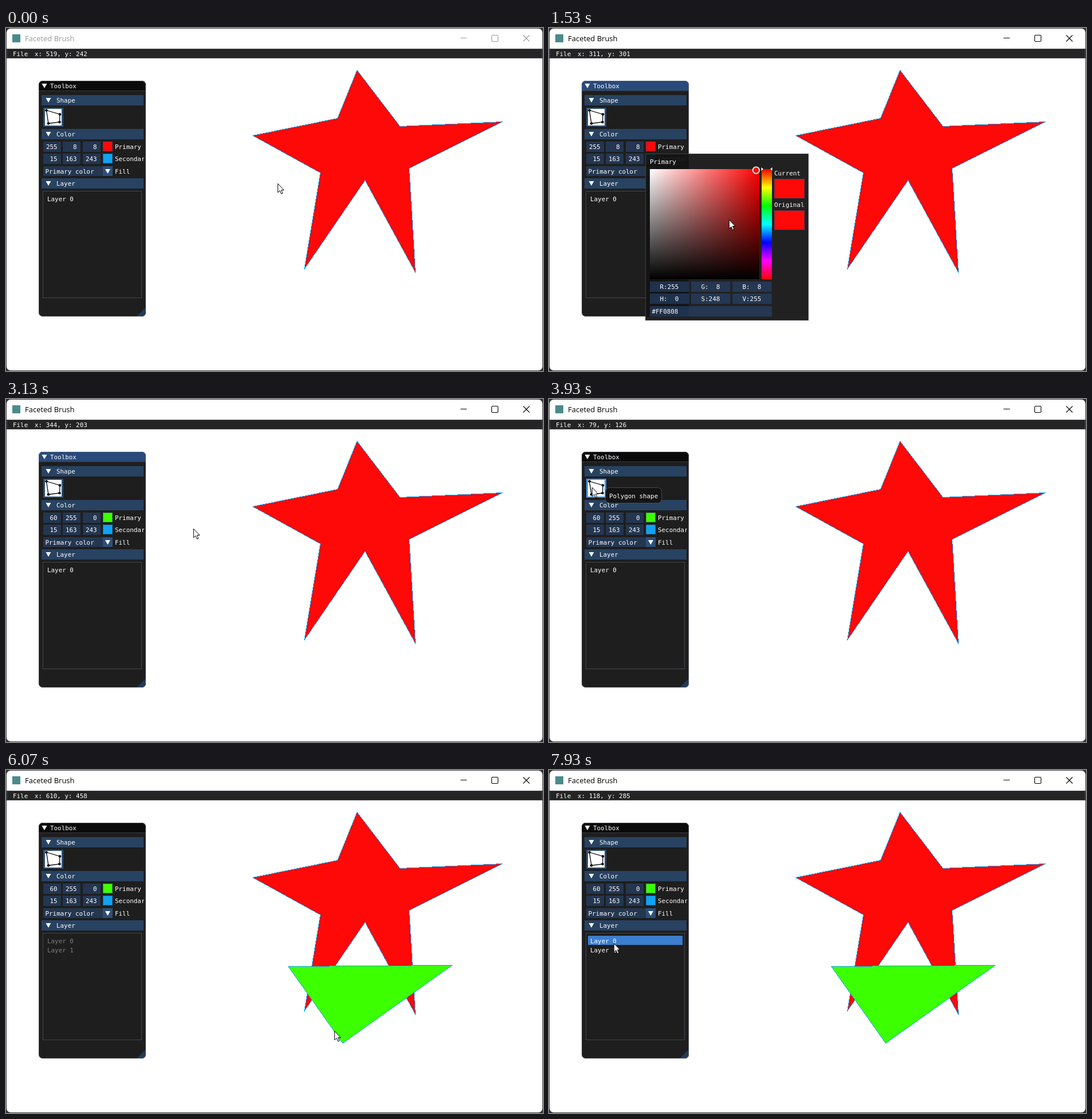
Recreate the animation shown at these times as an HTML page with a canvas. Size 937 by 598 pixels, loop 8000 ms.

```html
<!DOCTYPE html>
<html lang="en">
<head>
<meta charset="utf-8">
<title>Faceted Brush</title>
<style>
html, body { margin: 0; width: 100%; height: 100%; overflow: hidden; background: #333; }
canvas { display: block; width: 937px; height: 598px; }
</style>
</head>
<body>
<canvas id="stage" width="937" height="598"></canvas>
<script>
const ctx = document.getElementById('stage').getContext('2d');
const LOOP = 8000, TICK = 200 / 3, LAG = TICK / 2;
const MONO = '10.9px "DejaVu Sans Mono", monospace';
const SANS = '13px "Open Sans", "Noto Sans", sans-serif';
const FIELD = 'rgba(41,74,122,.54)', EDGE = 'rgba(110,110,128,.5)';
const BUTTON = 'rgb(45,79,119)';
const SECOND = [15, 163, 243];

// Colour picker geometry
const SV = { x: 176, y: 246, w: 191, h: 192 };

// Pointer strokes: start, end, then the point reached
const HOME = [493, 262];
const STROKES = [
  [-30, 67, 340, 338],
  [200, 933, 177, 208],    // primary swatch
  [1340, 1585, 319, 339],
  [1600, 1733, 380, 330],  // hue bar
  [1733, 2067, 381, 302.5],
  [2267, 2467, 347, 264],  // shade square
  [2467, 2733, 375, 236],
  [2800, 3133, 327, 226],
  [3200, 3960, 75, 154],   // polygon button
  [4067, 4667, 492, 342],  // first corner
  [4890, 4975, 677, 345],
  [5000, 5133, 778, 340],  // second corner
  [5333, 5733, 587, 476],  // third corner
  [5867, 6400, 522, 376],
  [7064, 7130, 311, 348],
  [7133, 7467, 120, 306],  // layer list
  [7667, 7950, 113, 302]
];

const STAR = [[612, 73], [687, 171], [866, 163], [703, 244], [714, 426],
  [626, 265], [520, 420], [548, 252], [430, 187], [578, 157]];
const TRIANGLE = [[492, 342], [778, 340], [587, 476]];
const ARROW = [[0, 0], [0, 15.5], [3.6, 12.2], [6.1, 17.8], [8.5, 16.8], [6.1, 11.2], [10.6, 11.2]];

const clamp = (v, lo, hi) => Math.max(lo, Math.min(hi, v));
const ease = u => u < .5 ? 4 * u ** 3 : 1 - 4 * (1 - u) ** 3;
const css = c => `rgb(${c.join()})`;
const pad = n => String(Math.round(n)).padStart(3);

function pointer(t) {
  let [x, y] = HOME;
  for (const [start, end, toX, toY] of STROKES) {
    const f = ease(clamp((t - start) / (end - start), 0, 1));
    x += (toX - x) * f;
    y += (toY - y) * f;
  }
  return [x, y];
}

// The dragging pointer sets hue first, then saturation and value
function pickedHsv(t) {
  const level = n => clamp(n, 0, 1) * 255;
  let h = 0, s = 247.5, v = 255;
  if (t >= 1733) h = level((pointer(Math.min(t, 2133))[1] - SV.y) / SV.h);
  if (t >= 2467) {
    const [x, y] = pointer(Math.min(t, 2800));
    s = level((x - SV.x) / SV.w);
    v = level(1 - (y - SV.y) / SV.h);
  }
  return [h, s, v];
}

function toRgb([h, s, v]) {
  const part = n => {
    const k = (n + h / 255 * 6) % 6;
    return Math.round(v - v * s / 255 * clamp(Math.min(k, 4 - k), 0, 1));
  };
  return [part(5), part(3), part(1)];
}

function rect(x, y, x2, y2, fill, stroke) {
  ctx.fillStyle = fill;
  ctx.fillRect(x, y, x2 - x, y2 - y);
  if (stroke) outline(x, y, x2, y2, stroke);
}

function outline(x, y, x2, y2, color) {
  ctx.strokeStyle = color;
  ctx.lineWidth = 1;
  ctx.strokeRect(x + .5, y + .5, x2 - x - 1, y2 - y - 1);
}

function roundPath(x, y, x2, y2, r) {
  ctx.beginPath();
  ctx.roundRect(x, y, x2 - x, y2 - y, r);
}

function poly(points, fill, stroke, width = 1) {
  ctx.beginPath();
  points.forEach(([x, y]) => ctx.lineTo(x, y));
  ctx.closePath();
  if (fill) { ctx.fillStyle = fill; ctx.fill(); }
  if (stroke) { ctx.strokeStyle = stroke; ctx.lineWidth = width; ctx.stroke(); }
}

function disc(x, y, r, fill) {
  ctx.beginPath();
  ctx.arc(x, y, r, 0, 7);
  ctx.fillStyle = fill;
  ctx.fill();
}

// Filled shape with a hard, one pixel edge
function paintShape(points, fill) {
  ctx.save();
  ctx.translate(.5, .5);
  poly(points, fill);
  ctx.restore();
  ctx.fillStyle = css(SECOND);
  points.forEach(([x, y], i) => {
    const [x2, y2] = points[(i + 1) % points.length];
    const n = Math.max(Math.abs(x2 - x), Math.abs(y2 - y));
    for (let k = 0; k < n; k++) {
      ctx.fillRect(Math.round(x + (x2 - x) * k / n), Math.round(y + (y2 - y) * k / n), 1, 1);
    }
  });
}

function text(str, x, midY, color = '#fff', font = MONO) {
  ctx.font = font;
  ctx.fillStyle = color;
  ctx.fillText(str, x, midY + 4);
}

function downArrow(x, y) {
  poly([[x - 4.5, y - 4], [x + 4.5, y - 4], [x, y + 4]], '#fff');
}

function drawWindow(active, [x, y]) {
  rect(0, 0, 937, 598, '#333');
  roundPath(1, 1, 936, 597, 7);
  ctx.fillStyle = '#fff';
  ctx.fill();

  const ink = active ? '#000' : '#999';
  rect(11, 11, 25, 25, '#4b8a8c');
  text('Faceted Brush', 33, 19, ink, SANS);
  ctx.strokeStyle = ink;
  ctx.lineWidth = 1.1;
  ctx.beginPath();
  ctx.moveTo(793, 17.5); ctx.lineTo(804, 17.5);
  ctx.moveTo(902.5, 12.5); ctx.lineTo(913.5, 23.5);
  ctx.moveTo(913.5, 12.5); ctx.lineTo(902.5, 23.5);
  ctx.stroke();
  roundPath(847.5, 12.5, 858.5, 23.5, 1.5);
  ctx.stroke();

  rect(1, 36, 936, 53, '#242424', EDGE);
  text('File', 12, 45);
  text(`x: ${Math.round((x - 1) * 1.055)}, y: ${Math.round((y - 36) * 1.07)}`, 50, 45);
}

function section(label, midY) {
  rect(62, midY - 9, 240, midY + 9, 'rgb(40,66,97)');
  downArrow(74, midY);
  text(label, 88, midY);
}

function colorRow(rgb, label, midY) {
  rgb.forEach((v, i) => {
    const x = Math.floor(65 + i * 34.7);
    rect(x, midY - 9, x + 31, midY + 9, FIELD);
    text(pad(v), x + 5, midY);
  });
  rect(169, midY - 9, 186, midY + 8, css(rgb), FIELD);
  text(label, 190, midY);
}

function drawShapeButton(hovered) {
  rect(65, 139, 100, 172, hovered ? '#4296fa' : BUTTON);
  rect(68, 141, 97, 170, '#fff');
  const quad = [[70.5, 143.5], [94, 150.5], [93.5, 164], [74, 166.5]];
  poly(quad, null, '#000', 1.3);
  quad.forEach(([x, y]) => disc(x, y, 2.3, '#000'));
}

function drawToolbox(s) {
  ctx.save();
  roundPath(57, 92, 244, 503, 7);
  ctx.clip();
  rect(57, 92, 244, 503, '#1e1e1e');
  rect(57, 92, 244, 109, s.focused ? 'rgb(41,74,122)' : '#0a0a0a');
  rect(57, 109, 244, 110, '#3b3b43');
  poly([[244, 487], [244, 503], [228, 503]], '#223a5a');
  downArrow(67, 101);
  text('Toolbox', 77, 101);

  section('Shape', 126);
  drawShapeButton(s.onShape);

  section('Color', 185);
  ctx.save();
  ctx.beginPath();
  ctx.rect(57, 190, 184, 80);
  ctx.clip();
  colorRow(s.rgb, 'Primary', 207);
  colorRow(SECOND, 'Secondary', 228);
  ctx.restore();
  rect(65, 241, 169, 258, FIELD);
  rect(169, 241, 186, 258, BUTTON);
  text('Primary color', 68.5, 250);
  downArrow(177.5, 250);
  text('Fill', 190, 250);

  section('Layer', 271);
  outline(64, 284, 237, 471, '#46464f');
  for (let i = 0; i < s.layers; i++) {
    const top = 289 + i * 16;
    if (s.hoverRow === i) rect(68, top, 233, top + 16, 'rgb(59,126,206)');
    text('Layer ' + i, 72, top + 9, s.drawing ? '#7d7d7d' : '#fff');
  }
  ctx.restore();
  roundPath(57.5, 92.5, 243.5, 502.5, 7);
  ctx.strokeStyle = EDGE;
  ctx.lineWidth = 1;
  ctx.stroke();
}

function gradient(x, y, x2, y2, stops) {
  const g = ctx.createLinearGradient(x, y, x2, y2);
  stops.forEach((c, i) => g.addColorStop(i / (stops.length - 1), c));
  return g;
}

function drawPicker(hsv, current, dragging) {
  const { x, y, w, h } = SV, right = x + w, bottom = y + h;
  const rgb = toRgb(hsv), pure = css(toRgb([hsv[0], 255, 255]));
  rect(168, 219, 453, 510, 'rgba(20,20,20,.94)', EDGE);
  text('Primary', 176, 233);
  rect(x, y, right, bottom, gradient(x, 0, right, 0, ['#fff', pure]));
  rect(x, y, right, bottom, gradient(0, y, 0, bottom, ['rgba(0,0,0,0)', '#000']));
  const wheel = ['#f00', '#ff0', '#0f0', '#0ff', '#00f', '#f0f', '#f00'];
  rect(371, y, 389, bottom, gradient(0, y, 0, bottom, wheel));

  const hueY = y + hsv[0] / 255 * h;
  [[370, 4.5], [390, -4.5]].forEach(([px, d]) =>
    poly([[px, hueY - 4], [px + d, hueY], [px, hueY + 4]], '#fff', '#000', .7));

  const sx = clamp(x + hsv[1] / 255 * w, x + 2, right - 2);
  const sy = clamp(y + (1 - hsv[2] / 255) * h, y + 2, bottom - 2);
  disc(sx, sy, dragging ? 9.4 : 5.7, css(current));
  ctx.lineWidth = 2.4;
  ctx.strokeStyle = '#808080';
  ctx.stroke();
  ctx.lineWidth = 1.2;
  ctx.strokeStyle = '#fff';
  ctx.stroke();

  text('Current', 393, 253);
  rect(393, 263, 446, 297, css(current), FIELD);
  text('Original', 393, 308);
  rect(393, 318, 446, 352, '#ff0808', FIELD);

  [['RGB', rgb, 451], ['HSV', hsv, 472]].forEach(([names, values, midY]) =>
    values.forEach((v, i) => {
      const left = x + i * 72;
      rect(left, midY - 9, left + 68.5, midY + 9, FIELD);
      text(names[i] + ':' + pad(v), left + 17.5, midY);
    }));
  rect(x, 485, 389, 503, FIELD);
  const hex = rgb.map(v => v.toString(16).padStart(2, '0')).join('');
  text('#' + hex.toUpperCase(), 179.5, 494);
}

function drawTooltip(x, y) {
  roundPath(x + 23.5, y + .5, x + 121.5, y + 27.5, 7);
  ctx.fillStyle = 'rgba(20,20,20,.94)';
  ctx.fill();
  ctx.strokeStyle = EDGE;
  ctx.lineWidth = 1;
  ctx.stroke();
  text('Polygon shape', x + 30, y + 15);
}

function drawPointer(x, y) {
  ctx.save();
  ctx.translate(x + .3, y + .3);
  ctx.lineJoin = 'round';
  poly(ARROW, '#fff', '#000');
  ctx.restore();
}

function draw(time) {
  const t = Math.floor((time + 4) / TICK) * TICK + .5;
  const during = (a, b) => t >= a && t < b;
  const [x, y] = pointer(t).map(Math.round);
  const inside = (l, u, r, b) => x >= l && x < r && y >= u && y < b;
  const picking = during(1130, 3066), drawing = during(4133, 6133);
  const inList = !picking && !drawing && inside(68, 289, 233, 321);
  const rgb = toRgb(pickedHsv(t - 2 * LAG));
  const onShape = !picking && inside(65, 139, 100, 172);

  drawWindow(t > 1066, pointer(t - LAG));
  paintShape(STAR, '#ff0808');
  if (t > 5866) paintShape(TRIANGLE, '#3cff00');
  drawToolbox({
    rgb, drawing, onShape,
    focused: during(1130, 3266) || during(4133, 4666),
    layers: t < 4666 ? 1 : 2,
    hoverRow: inList ? Math.floor((y - 289) / 16) : -1
  });
  if (picking) drawPicker(pickedHsv(t - LAG), rgb, during(2467, 2734));
  if (onShape) drawTooltip(x, y);
  drawPointer(x, y);
}

const start = performance.now();
function loop() {
  draw((performance.now() - start) % LOOP);
  requestAnimationFrame(loop);
}
loop();
</script>
</body>
</html>
```
